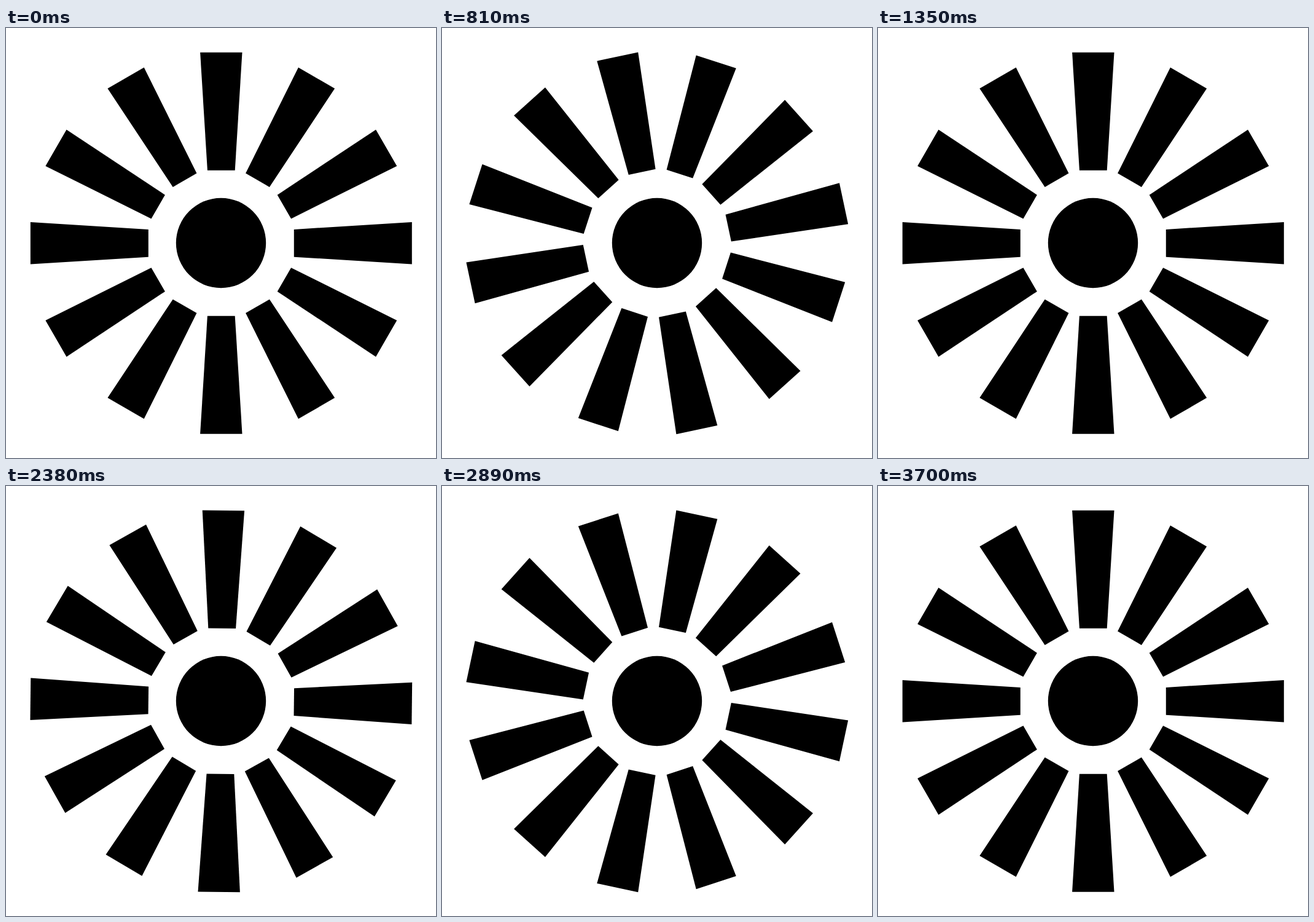
Animation, 700 px wide and 700 px high, one loop 4.7 s. Source, as an HTML page:

```html
<!DOCTYPE html>
<html lang="en">
<head>
<meta charset="utf-8">
<title>Turning sun</title>
<style>
  html, body { margin: 0; width: 100%; height: 100%; overflow: hidden; background: #fff; }
  svg { display: block; width: 100vw; height: 100vh; }
</style>
</head>
<body>
<svg viewBox="-350 -350 700 700">
  <circle r="73.2"/>
  <g transform="translate(.3 .3)">
    <g id="rays"></g>
  </g>
</svg>
<script>
  const RAYS = 12, STEP_MS = 30, STEPS = 45, PERIOD = 2350;
  const SECTOR = 360 / RAYS;
  const rays = document.getElementById('rays');

  for (let i = 0; i < RAYS; i++) {
    const ray = document.createElementNS(rays.namespaceURI, 'path');
    ray.setAttribute('d', 'M-34.2-310.5H34.2L22.4-118.5H-22.4Z');
    ray.setAttribute('transform', `rotate(${i * SECTOR})`);
    rays.append(ray);
  }

  // Turn by one sector in even steps, then rest; the loop repeats seamlessly.
  function draw(now) {
    const step = Math.min(STEPS, Math.floor(now % PERIOD / STEP_MS));
    rays.setAttribute('transform', `rotate(${step * SECTOR / STEPS})`);
  }

  const start = performance.now();
  function tick() {
    draw(performance.now() - start);
    requestAnimationFrame(tick);
  }
  tick();
</script>
</body>
</html>
```
